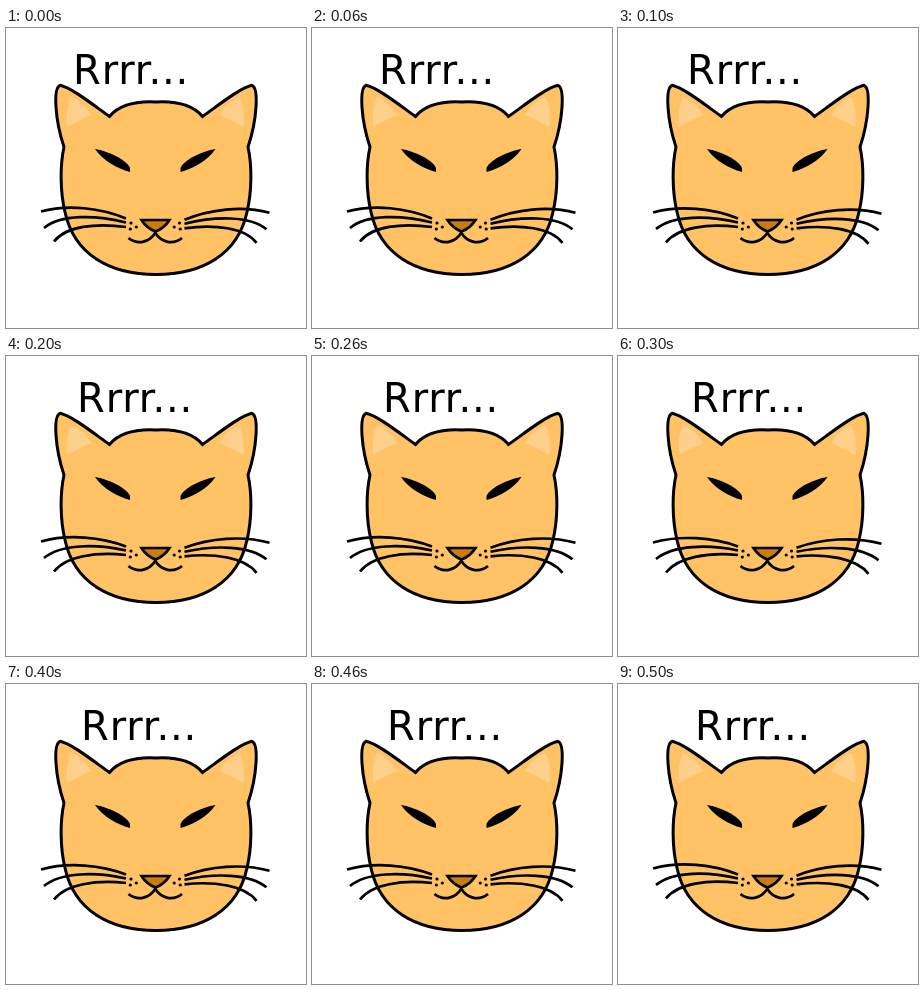
Write an HTML page with a canvas that moves like this. It is 300 px wide and 300 px high and loops after 0.6 s.

```html
<!DOCTYPE html>
<html lang="en">
<head>
<meta charset="utf-8">
<title>Purring cat</title>
<style>
  html, body { margin: 0; width: 100%; height: 100%; overflow: hidden; background: #fff; }
  canvas { display: block; }
</style>
</head>
<body>
<canvas id="stage" width="300" height="300"></canvas>
<script>
const ctx = document.getElementById('stage').getContext('2d');
const STEP = 100, STEPS = 6;
const FUR = '#ffc365', EAR = '#ffcf8c', NOSE = '#c87d0e';

const head = new Path2D(`M150 74 C130 73 114 76 103.5 88.5 C86 76 66 60 54 57.3
  C47 60 49 92 58 119 C54 137 54 163 59 184 C68 226 103 246.4 150 246.4
  C197 246.4 232 226 241 184 C246 163 246 137 242 119
  C251 92 253 60 246 57.3 C234 60 214 76 196.5 88.5 C186 76 170 73 150 74 Z`);
const ear = new Path2D('M65 69 C73 72 80 78 85 87 C76 91 68 95 61 99 C60 88 61 78 65 69 Z');
const eye = new Path2D('M89 121 C102 123 121 132 124 140 L124 144 C111 140.5 97 132.5 89 121 Z');
const nose = new Path2D('M135.5 192 L163.5 192 Q158 200.5 149.5 203.5 Q141 200.5 135.5 192 Z');
const mouth = new Path2D('M149.5 204.5 C143 215 131 217 122.5 210');
const dots = [[125, 195], [130.3, 199], [124.3, 201]];

// Each whisker: tip, two control points, root
const whiskers = [
  [35, 183.5, 62, 176, 95, 180, 120, 190.5],
  [38, 200, 55, 186, 90, 187, 120, 194.5],
  [48, 213.5, 60, 198, 90, 195, 120, 199]
];

// The right half mirrors the left; its parts may sit a little lower
function bothSides(draw, lower = 0) {
  draw();
  ctx.save();
  ctx.translate(298.5, lower);
  ctx.scale(-1, 1);
  draw();
  ctx.restore();
}

function drawFace() {
  ctx.lineWidth = 3;
  ctx.strokeStyle = '#000';
  ctx.fillStyle = FUR;
  ctx.fill(head);
  ctx.stroke(head);
  bothSides(() => {
    ctx.fillStyle = EAR;
    ctx.fill(ear);
    ctx.fillStyle = '#000';
    ctx.fill(eye);
    for (const [x, y] of dots) {
      ctx.beginPath();
      ctx.arc(x, y, 1.6, 0, Math.PI * 2);
      ctx.fill();
    }
    ctx.lineWidth = 2.7;
    ctx.stroke(mouth);
  });
  ctx.fillStyle = NOSE;
  ctx.fill(nose);
  ctx.lineWidth = 2.7;
  ctx.stroke(nose);
}

function drawWhiskers(drop) {
  ctx.lineWidth = 2.7;
  bothSides(() => {
    for (const [x, y, ax, ay, bx, by, rx, ry] of whiskers) {
      ctx.beginPath();
      ctx.moveTo(x, y + drop);
      ctx.bezierCurveTo(ax, ay + drop, bx, by + drop * 0.4, rx, ry);
      ctx.stroke();
    }
  }, 1.3);
}

function render(now) {
  const step = Math.floor(now / STEP) % STEPS;
  ctx.fillStyle = '#fff';
  ctx.fillRect(0, 0, 300, 300);
  drawFace();
  drawWhiskers(3 - Math.abs(3 - step));
  ctx.fillStyle = '#000';
  ctx.font = '40px Verdana, "DejaVu Sans", sans-serif';
  ctx.letterSpacing = '0.85px';
  ctx.fillText('Rrrr...', 67 + step * 2, 55.7);
}

const start = performance.now();
function loop() {
  render(performance.now() - start);
  requestAnimationFrame(loop);
}
loop();
</script>
</body>
</html>
```
